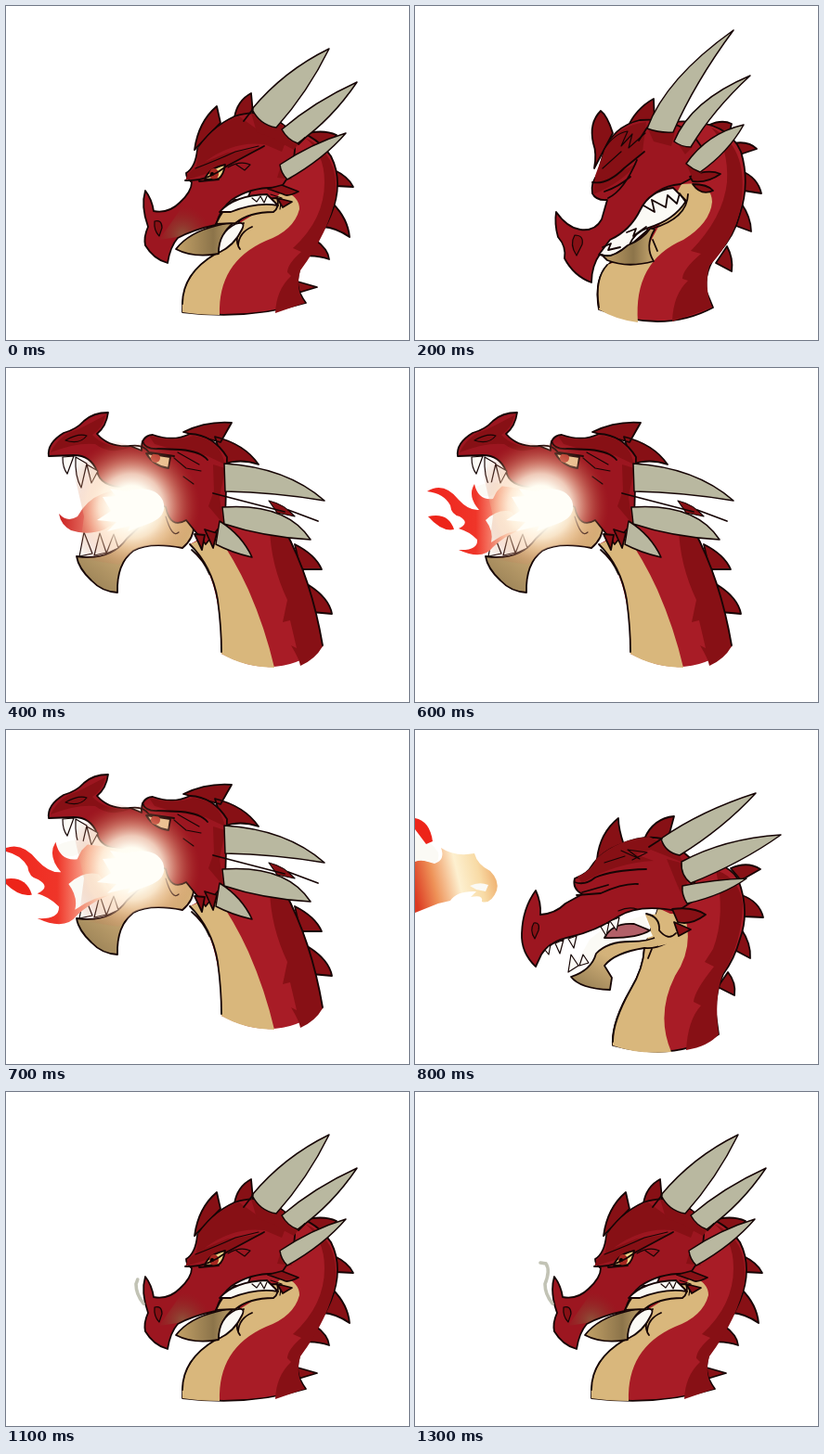
Write an HTML page that moves like this. It is 434 px wide and 360 px high and loops after 1400 ms.

```html
<!DOCTYPE html>
<html lang="en">
<head>
<meta charset="utf-8">
<title>Fire dragon</title>
<style>
html, body { margin: 0; width: 100%; height: 100%; overflow: hidden; background: #fff; }
svg { display: block; width: 434px; height: 360px; }
.pose, .flame { display: none; }
.on { display: inline; }
.o, .l { stroke: #160505; stroke-width: 1.8; stroke-linejoin: round; stroke-linecap: round; }
.l { fill: none; }
.thin { stroke-width: 1.2; }
.red { fill: #a81c26; }
.head { fill: #9c1620; }
.dark { fill: #871015; }
.horn { fill: #b9b8a0; stroke-width: 1.5; }
.tan { fill: #d9b77c; }
.w { fill: #fbfaf5; }
.fire { fill: #ed2419; }
</style>
</head>
<body>
<svg viewBox="0 0 434 360">
<defs>
  <linearGradient id="jaw" x1="0" x2="1"><stop offset="0" stop-color="#c4a268"/><stop offset=".6" stop-color="#8c744a"/><stop offset="1" stop-color="#c9a970"/></linearGradient>
  <linearGradient id="chin" x1="0" y1="1" x2="1" y2="0"><stop offset="0" stop-color="#8f784f"/><stop offset=".5" stop-color="#d3b27a"/><stop offset="1" stop-color="#d9b77c"/></linearGradient>
  <radialGradient id="glow" gradientUnits="userSpaceOnUse" cx="135" cy="149" r="74">
    <stop offset="0" stop-color="#fff"/><stop offset=".3" stop-color="#fffdf2"/>
    <stop offset=".47" stop-color="#ffeed8" stop-opacity=".84"/><stop offset=".66" stop-color="#f7c8a4" stop-opacity=".48"/><stop offset=".85" stop-color="#d98a68" stop-opacity=".2"/><stop offset="1" stop-color="#c04030" stop-opacity="0"/>
  </radialGradient>
  <clipPath id="lit"><path d="M72 108L98 72L134 84L240 60L228 166L190 194Q155 187 137 197L121 212L78 205L84 160Z"/></clipPath>
  <linearGradient id="lick" gradientUnits="userSpaceOnUse" x1="56" y1="0" x2="125" y2="0"><stop offset="0" stop-color="#c91d1d"/><stop offset=".5" stop-color="#e8786a"/><stop offset="1" stop-color="#fff4e4"/></linearGradient>
  <linearGradient id="blast" gradientUnits="userSpaceOnUse" x1="13" y1="0" x2="118" y2="0"><stop offset="0" stop-color="#f0231b"/><stop offset=".5" stop-color="#ef3529"/><stop offset=".75" stop-color="#f9a58d"/><stop offset="1" stop-color="#fffaf0"/></linearGradient>
  <linearGradient id="ball" gradientUnits="userSpaceOnUse" x1="0" y1="178" x2="88" y2="158"><stop offset="0" stop-color="#dc3a22"/><stop offset=".25" stop-color="#ee9258"/><stop offset=".55" stop-color="#fdf0d0"/><stop offset=".8" stop-color="#f8dba6"/><stop offset="1" stop-color="#efb070"/></linearGradient>
  <radialGradient id="snout" gradientUnits="userSpaceOnUse" cx="190" cy="246" r="30"><stop offset="0" stop-color="#8a6040" stop-opacity=".8"/><stop offset="1" stop-color="#8a3028" stop-opacity="0"/></radialGradient>
</defs>

<g id="rest" class="pose">
  <path class="o dark" d="M318 139Q340 132 356 139L345 153ZM352 176Q369 184 374 195L355 194ZM352 213Q368 229 370 249Q356 239 341 238ZM333 252Q347 262 348 273Q334 268 318 270ZM314 297L335 303L315 309Z"/>
  <path class="o red" d="M290 128Q332 135 350 162Q364 190 350 225Q343 243 330 257Q313 281 314 301Q316 311 323 320Q260 339 190 330Q188 290 226 267L250 235Z"/>
  <path class="dark" d="M322 142Q343 158 343 190Q343 230 309 261L318 265Q303 278 303 287L307 291Q291 306 290 331L322 320Q311 306 317 285Q348 243 355 205Q359 158 322 142Z"/>
  <path class="tan" d="M190 330Q187 291 226 267Q243 253 250 235L284 214L298 199Q316 205 316 219Q310 242 280 253Q228 276 230 333Q208 333 190 330Z"/>
  <path class="l" d="M190 321Q190 288 226 267M256 234Q244 251 252 262M265 238Q251 244 250 258"/>
  <path class="o dark" d="M203 155Q207 125 227 108L231 126ZM246 120Q249 102 264 94L266 116Z"/>
  <path class="o head" d="M150 199Q157 208 159 221Q175 224 187 212Q200 200 200 190Q194 186 194 180Q204 174 206 155Q220 131 246 119Q284 106 310 140Q314 158 304 184L296 196Q265 194 243 209Q231 218 226 236Q201 241 185 250Q177 259 174 277Q159 273 150 258Q148 249 153 238Q145 216 150 199Z"/>
  <path d="M165 252L185 249Q201 240 226 236Q231 220 240 210L190 216Z" fill="url(#snout)"/>
  <path class="dark" d="M207 153Q227 126 251 119L272 134L303 142L297 157L278 149Q245 145 214 168L239 158L278 153Q249 164 237 174L193 188Q196 178 205 174Z"/>
  <path class="o" fill="url(#jaw)" d="M183 262Q197 244 226 237L250 231Q231 240 229 267Q202 272 183 262Z"/>
  <path class="o w" d="M229 266Q229 244 247 235Q259 231 254 241Q246 258 229 266Z"/>
  <path class="o tan" d="M226 235Q235 216 246 209L292 207Q295 217 288 222Q262 222 247 234Z"/>
  <path class="o w" d="M230 222Q246 204 281 203L293 215Q270 211 242 222Z"/>
  <path class="l thin" d="M265 207L270 211L274 205L278 212L281 205M285 203L297 207L295 219"/>
  <path class="o dark" d="M282 197L297 193L315 200Q303 206 299 203ZM292 207L308 211L298 217Z"/>
  <path class="o" fill="#f0d98c" d="M214 187Q218 175 236 171Q234 183 229 186Z"/>
  <ellipse cx="224" cy="181" rx="5" ry="6" fill="#a62820"/><circle cx="222" cy="181" r="2"/>
  <path class="l" d="M193 188Q215 190 237 173L278 151M208 189L229 187"/>
  <path class="l thin" d="M204 175Q230 165 247 157L272 151M239 174Q252 166 263 171L257 177L248 171"/>
  <path class="o dark thin" d="M160 232Q168 230 168 239L165 248Q159 242 160 232Z"/>
  <path class="dark" d="M264 115Q282 129 299 128L292 144L270 136ZM296 134L316 147L310 155L291 145ZM297 169L308 187L292 185Z"/>
  <path class="o horn" d="M265 111Q299 70 348 46Q325 93 291 131Q273 128 265 111ZM297 133Q332 103 378 82Q351 122 314 148Q303 144 297 133ZM295 171Q329 148 366 137Q342 165 303 187Q296 180 295 171Z"/>
  <path class="l" d="M266 111L256 124M315 149L322 142"/>
</g>

<g id="brace" class="pose">
  <path class="o dark" d="M317 128Q331 122 341 127L338 138ZM343 148Q359 145 368 154L350 160ZM352 178Q369 185 373 202L354 199ZM351 212Q362 228 362 243L343 236ZM336 259Q343 272 341 286L324 277Z"/>
  <path class="o red" d="M275 125Q335 120 351 157Q361 190 350 224Q344 248 326 267Q311 285 314 308L321 325Q267 354 198 327Q192 292 210 277L250 242Z"/>
  <path class="dark" d="M319 131Q338 151 336 190Q332 228 297 264L308 267Q288 284 288 294L294 296Q278 311 277 340L320 325Q311 304 317 280Q347 249 352 208Q358 150 319 131Z"/>
  <path class="tan" d="M198 327Q194 294 207 279L248 264L287 192Q319 188 320 211Q318 234 289 252Q235 275 240 341Q216 338 198 327Z"/>
  <path class="l" d="M198 325Q193 294 207 279"/>
  <path class="o dark" d="M193 175Q196 159 192 148Q187 126 200 113Q207 118 213 137ZM228 133Q237 111 257 100L258 126Z"/>
  <path class="o head" d="M152 222Q164 239 178 241Q194 243 201 230L207 209Q195 210 191 202Q189 190 197 181L203 158Q213 130 242 123Q288 119 308 151L303 183L286 192Q257 194 242 222Q228 248 200 266Q190 280 190 298Q171 291 161 272Q163 259 154 249Q150 235 152 222Z"/>
  <path class="dark" d="M194 183L205 153Q218 129 249 125L245 157L221 178L239 170Q222 191 192 203Z"/>
  <path class="l" d="M191 190Q207 193 225 175L247 157M208 207Q225 199 239 166M204 200Q219 195 232 184"/>
  <path class="l thin" d="M204 154Q215 137 229 135L222 151L234 138L230 153L248 137M202 175L222 157"/>
  <path class="o w" d="M198 268L210 252Q232 242 243 219Q253 199 278 196L292 210Q279 231 251 239Q235 245 231 258L211 270Z"/>
  <path class="l" d="M246 215L258 222L255 209L270 217L272 204L282 213L285 202L292 212M228 244L238 240L235 248L249 238M202 260L211 256L208 263L221 260"/>
  <path class="o" fill="url(#jaw)" d="M201 268Q212 273 229 258Q245 252 254 239L258 241Q247 259 257 275Q229 283 207 274Z"/>
  <path class="l" d="M255 240Q293 229 294 203M256 252L261 264"/>
  <path class="o dark" d="M296 184Q315 175 329 181Q315 191 299 189ZM299 192Q315 192 321 199Q308 205 299 192Z"/>
  <path class="o dark thin" d="M172 247Q182 247 180 257L174 269Q166 257 172 247Z"/>
  <path class="dark" d="M249 128L280 135L276 151L257 146ZM281 145L299 152L291 160ZM291 168L309 179L300 188Z"/>
  <path class="o horn" d="M250 132Q270 78 343 26Q301 83 278 136Q263 137 250 132ZM279 146Q297 102 361 75Q321 112 297 152Q287 152 279 146ZM292 170Q315 137 354 128Q337 158 307 179Q299 176 292 170Z"/>
  <path class="l" d="M250 131L241 145"/>
</g>

<g id="roar" class="pose">
  <path class="o dark" d="M311 190Q333 201 340 217L317 217ZM326 234Q348 248 351 265L329 263Z"/>
  <path class="red" d="M198 190L245 164L300 174Q330 231 341 300Q292 340 232 308Q232 222 198 190Z"/>
  <path class="dark" d="M284 172Q285 212 303 250L298 274L306 272L313 302L307 299Q316 314 317 321Q333 314 341 300Q328 225 301 174Z"/>
  <path class="tan" d="M198 190L226 178Q246 206 261 239Q279 280 289 323Q255 322 232 308Q232 280 228 250Q222 214 198 190Z"/>
  <path class="l" d="M198 190Q222 214 228 250Q232 280 232 306M300 174Q329 228 341 299"/>
  <path class="l" stroke-width="3" d="M200 196Q213 207 219 222"/>
  <path class="o dark" d="M191 69Q216 57 243 59L231 80ZM225 74Q257 82 272 104Q252 97 234 104Z"/>
  <path class="o" fill="url(#chin)" d="M76 203Q113 208 130 184L172 144L202 169Q203 183 190 194Q155 187 137 197Q119 211 120 242Q103 241 92 229Q78 216 76 203Z"/>
  <path class="o head" d="M110 48Q108 63 98 71Q111 86 134 84L146 89Q145 73 158 72Q180 80 198 71Q223 72 238 96L236 164L215 190L194 164Q177 174 172 150L137 128Q102 131 98 111Q91 94 73 94L46 95Q44 81 62 70Q76 66 84 57Q94 48 110 48Z"/>
  <path class="dark" d="M48 91Q57 72 78 66L107 51Q104 65 93 72Q106 86 132 86Q112 94 96 82Q76 80 48 91ZM154 73Q183 80 202 73Q230 76 236 104L215 94L181 88L160 82ZM223 104L236 108L230 139L234 168L218 149L224 132Z"/>
  <path class="o dark" d="M203 179L214 180L211 196ZM214 174L227 178L223 194Z"/>
  <path class="o dark thin" d="M64 78Q78 70 87 73Q79 83 64 78Z"/>
  <path class="o" fill="#efcf9c" d="M151 92L177 96L175 108Q159 106 151 92Z"/>
  <ellipse cx="161" cy="97" rx="5" ry="5" fill="#b8342a"/>
  <path class="l" d="M134 84Q148 82 154 91L181 95M147 79Q150 88 164 87L188 88Q210 90 217 99"/>
  <path class="l thin" d="M181 97L194 108L210 111M185 91L208 104M191 117L202 125M172 160Q179 184 186 177"/>
  <path class="o w thin" d="M61 96Q61 108 66 114L73 95ZM75 96Q74 117 81 129L87 103ZM87 104L92 124L99 111ZM79 203L84 177L93 200ZM95 202L101 178L108 199ZM108 200L116 179L121 194Z"/>
  <path class="o dark thin" d="M283 143Q300 147 311 160L292 156Z"/>
  <path class="o horn" d="M235 103Q302 107 343 143Q290 134 236 133ZM233 150Q302 145 328 185Q277 182 235 168ZM230 165Q254 180 265 204Q243 199 226 190Z"/>
  <path class="l" d="M223 135L246 141L300 155M304 153L336 165"/>
  <g id="lickFlame" class="flame">
    <path fill="url(#lick)" d="M57 157Q66 167 77 160Q87 142 103 136Q122 128 135 134L142 164Q121 163 106 174Q88 181 70 175Q59 169 57 157Z"/>
  </g>
  <g id="blastFlame" class="flame">
    <path fill="url(#blast)" d="M13 133Q31 122 47 142Q58 154 69 153Q56 138 64 125Q68 143 84 141L91 127L130 132L139 170Q107 171 84 193Q73 208 47 196Q68 197 67 185Q58 176 47 173Q60 167 48 160Q39 158 38 148Q31 135 13 133Z"/>
    <path class="w" d="M66 128Q69 142 84 137L94 127Q85 119 66 128ZM76 164Q90 151 104 155L118 174Q100 175 82 188Q85 176 76 164Z"/>
    <path class="fire" d="M14 160Q36 155 42 174Q29 177 14 160Z"/>
  </g>
  <circle cx="135" cy="149" r="74" fill="url(#glow)" clip-path="url(#lit)"/>
  <path fill="#fffef8" d="M104 139L118 138L112 130L130 133Q160 125 169 143Q175 160 153 168L131 176L134 170L109 176L119 166L98 164L113 154Z"/>
</g>

<g id="snap" class="pose">
  <path class="o dark" d="M340 149Q358 141 372 150L351 162ZM352 178Q371 185 375 202L354 201ZM351 214Q362 230 361 246L344 237ZM337 261Q346 272 344 286L326 277Z"/>
  <path class="o red" d="M280 140Q334 137 348 161Q361 195 350 225Q344 247 332 263Q323 284 324 306L327 328Q281 358 213 340Q211 316 232 280Q246 257 247 235Z"/>
  <path class="dark" d="M324 151Q335 199 321 236L312 250L322 255Q301 281 300 293L308 297Q294 312 292 345Q316 341 327 328Q322 290 331 264Q352 230 353 188Q350 160 324 151Z"/>
  <path class="tan" d="M213 340Q211 316 232 280Q246 257 247 234L262 192L292 206Q299 237 280 265Q259 307 276 347Q239 350 213 340Z"/>
  <path class="l" d="M213 336Q213 314 232 280Q246 257 247 235M255 236L251 246"/>
  <path class="o dark" d="M196 139Q199 111 219 95Q219 106 225 124ZM247 117Q257 95 279 93L272 119Z"/>
  <path class="w" d="M168 262L188 226L204 213L246 200L256 222L200 242Z"/>
  <path class="o" fill="#b26068" d="M204 224Q213 207 236 209L253 216Q239 225 204 224Z"/>
  <path class="o" fill="url(#chin)" d="M168 266Q190 259 195 241Q207 228 232 228Q252 228 262 222L270 230Q259 236 247 235Q215 240 204 254L212 267L210 280Q178 279 168 266Z"/>
  <path class="tan" d="M248 199L280 198L282 228L262 233L258 224Z"/>
  <path class="o head" d="M130 173Q136 186 135 199Q151 198 162 187L180 177Q169 171 172 160Q186 155 190 147Q200 131 222 123Q256 109 278 122L302 143L300 184L283 195Q241 187 219 201Q194 217 167 223Q145 228 136 242L130 255Q114 240 115 219Q116 192 130 173Z"/>
  <path class="dark" d="M175 158Q190 152 196 138Q218 118 252 115L281 129L289 143L254 129L238 134L257 141Q216 143 180 165ZM271 139L297 146L289 181L282 166Z"/>
  <path class="l" d="M172 164Q183 168 194 159Q212 151 249 150M174 178L200 176Q224 165 240 166M180 175L208 167"/>
  <path class="l thin" d="M222 130L242 139L229 129L250 132L234 140M204 143L226 136M219 195Q230 190 239 193"/>
  <path class="o w thin" d="M140 237L144 242L146 231ZM151 230L156 241L160 226ZM165 225L171 235L174 222ZM200 212L206 222L209 207ZM210 206L217 216L220 202ZM165 261L168 242L176 254ZM177 254L181 242L187 251Z"/>
  <path class="l" d="M249 198Q264 201 263 216Q273 228 281 219"/>
  <path class="o dark" d="M277 193Q300 190 313 199Q297 211 283 207ZM279 207L297 215L284 222Z"/>
  <path class="o dark thin" d="M128 208Q135 207 133 216L129 225Q123 216 128 208Z"/>
  <path class="o horn" d="M265 117Q308 87 367 68Q332 106 285 135Q269 132 265 117ZM287 142Q333 117 394 113Q352 143 297 165Q286 157 287 142ZM288 168Q323 161 357 160Q332 178 293 187Q287 178 288 168Z"/>
  <path class="l" d="M266 117L252 126"/>
  <path fill="url(#ball)" d="M0 138L21 144Q33 140 28 127Q43 137 64 133Q67 145 81 152Q91 162 88 173Q82 188 72 185Q74 177 60 180L66 174Q45 173 38 184L25 187L0 197Z"/>
  <path class="w" d="M0 113Q17 119 25 132Q27 142 20 143Q6 139 0 142ZM59 168Q69 163 79 167L76 174L66 172Z"/>
  <path class="fire" d="M0 95Q16 98 19 120L12 123L0 107Z"/>
</g>

<path id="smoke" fill="none" stroke="#c2c3b5" stroke-width="3.6" stroke-linecap="round" d="M148 228Q140 218 140 207Q146 192 141 185L135 184"/>
</svg>
<script>
const $ = id => document.getElementById(id);
const LOOP = 1400, STEP = 100;
const poses = ["rest", "brace", "brace", "snap", "roar", "roar", "roar", "roar", "snap"];
const blastSize = { 5: 0.72, 6: 1, 7: 1.16 };
const smokeSize = { 10: 14, 11: 28, 12: 42, 13: 60 };
let last = -1;

function show(id, on) {
  $(id).classList.toggle("on", on);
}

function draw(step) {
  const pose = poses[step] || "rest";
  for (const id of ["rest", "brace", "roar", "snap"]) show(id, id === pose);

  // the head is still pulling back on the first braced step
  $("brace").setAttribute("transform", step === 1 ? "translate(-2 3)" : "");

  const size = blastSize[step];
  show("lickFlame", step === 4);
  show("blastFlame", !!size);
  if (size) $("blastFlame").setAttribute("transform", `translate(130 152) scale(${size}) translate(-130 -152)`);

  const len = smokeSize[step] || 0;
  $("smoke").style.display = len ? "inline" : "none";
  $("smoke").setAttribute("stroke-dasharray", `${len} 100`);
}

function tick() {
  const step = Math.floor(performance.now() % LOOP / STEP);
  if (step !== last) draw(last = step);
  requestAnimationFrame(tick);
}
tick();
</script>
</body>
</html>
```
